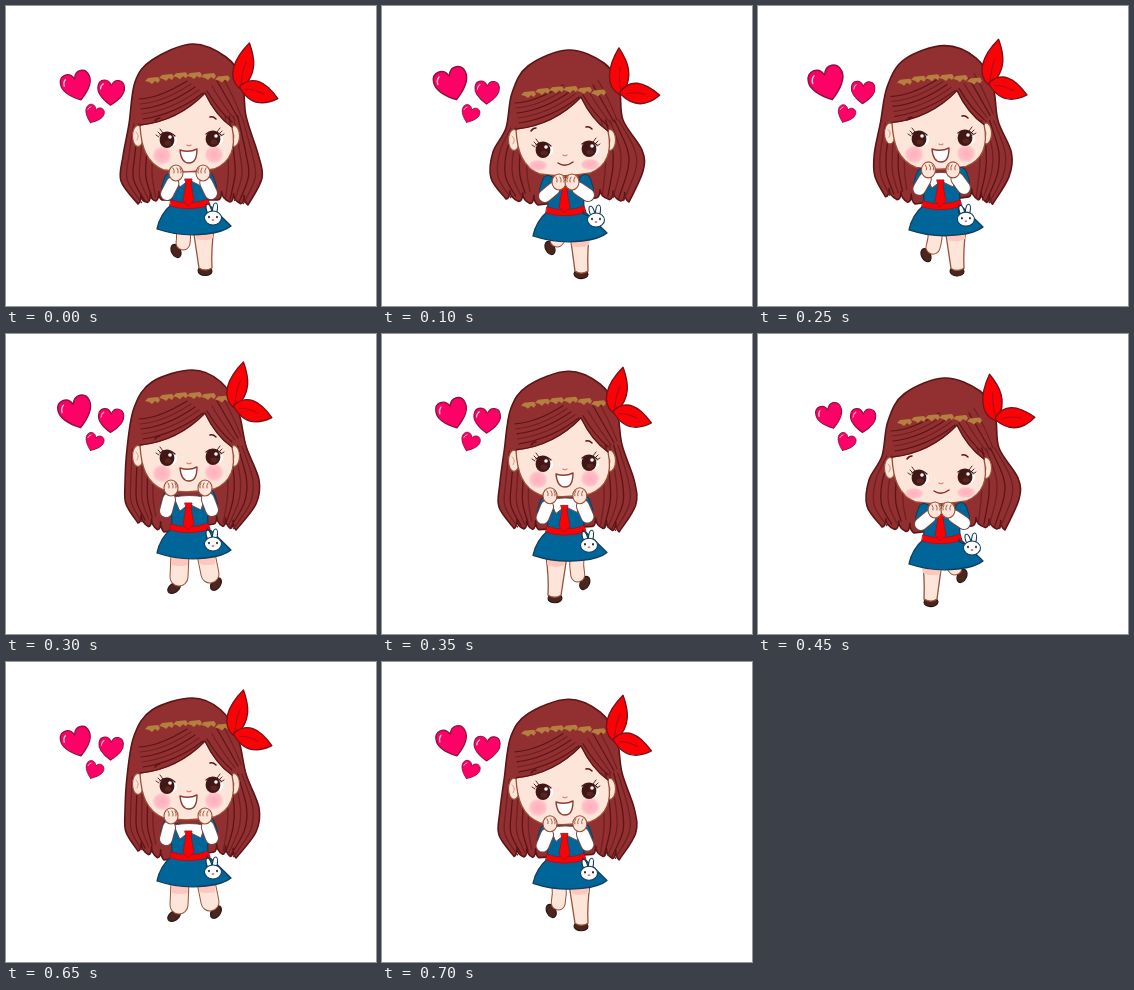
Recreate the animation shown at these times as an HTML page with a canvas. Size 370x300 px, loop 750 ms.

```html
<!DOCTYPE html>
<html lang="en">
<head>
<meta charset="utf-8">
<title>Happy girl</title>
<style>
  html, body { margin: 0; width: 100%; height: 100%; overflow: hidden; background: #fff; }
  canvas { display: block; }
</style>
</head>
<body>
<canvas id="stage" width="370" height="300"></canvas>
<script>
const ctx = document.getElementById('stage').getContext('2d');
const STEP = 50, STEPS = 15;
const INK = '#5c1517', HAIR = '#922f31', SHADE = '#6f2023', GOLD = '#b5803f';
const SKIN = '#fee5d9', SKIN_INK = '#9a5138', BLUE = '#00669a', NAVY = '#123d5b';
const RED = '#fb0306', PINK = '#ff0066', SHOE = '#4b261e', CUFF_INK = '#71494a';

// Offsets are relative to the middle pose; left and right are hair contours.
const MID = {
  cap: 0, face: 0, eyes: 0, gold: 0, body: 0,
  hands: [170, 167, 197, 167], elbows: [161, 188, 205, 187],
  bow: [234, 80, 0], bunny: [207, 211], lift: [170, 245],
  left: [[146, 54], [129, 76], [123, 118], [117, 150], [115, 175], [132, 198], [156, 194]],
  right: [[220, 51], [236, 74], [240, 110], [252, 148], [256, 172], [242, 199], [212, 194]]
};
const LOW = {
  cap: 6, face: 4, eyes: 10, gold: 14, body: 7,
  hands: [177, 176, 190, 176], elbows: [163, 190, 206, 189],
  bow: [238, 86, -.24], bunny: [214, 213], lift: [168, 242],
  left: [[146, 60], [130, 87], [124, 122], [111, 146], [109, 172], [124, 193], [156, 199]],
  right: [[222, 57], [237, 82], [241, 114], [260, 144], [261, 165], [247, 196], [214, 192]]
};
const LANDING = { ...LOW, bow: [237, 84, -.34] };
const SETTLED = {
  ...LOW,
  bow: [235, 83, 0], bunny: [209, 216],
  left: [[147, 60], [131, 88], [124, 120], [113, 145], [113, 170], [122, 193], [156, 198]],
  right: [[222, 57], [238, 84], [240, 118], [254, 148], [252, 172], [240, 201], [214, 192]]
};
const HIGH = {
  cap: -2, face: -8, eyes: -10, gold: -8, body: -4,
  hands: [165, 154, 199, 154], elbows: [160, 177, 206, 176],
  bow: [228, 71, 0], bunny: [207, 209], lift: [168, 255],
  left: [[146, 48], [128, 74], [121, 115], [119, 150], [120, 170], [132, 189], [158, 198]],
  right: [[215, 48], [232, 76], [240, 112], [253, 146], [250, 170], [230, 196], [208, 190]]
};

function mix(a, b, t) {
  if (typeof a === 'number') return a + (b - a) * t;
  if (Array.isArray(a)) return a.map((v, i) => mix(v, b[i], t));
  return Object.fromEntries(Object.keys(a).map(k => [k, mix(a[k], b[k], t)]));
}

const falling = mix(HIGH, MID, .6), dropping = mix(MID, LOW, .55);
const sinking = mix(LOW, SETTLED, .5), rising = mix(SETTLED, HIGH, .55);
const POSES = [MID, dropping, LOW, sinking, SETTLED, rising, HIGH, falling,
  dropping, LANDING, sinking, SETTLED, rising, HIGH, falling];

function paint(path, fill, ink, width = 1.3) {
  if (fill) { ctx.fillStyle = fill; ctx.fill(path); }
  if (ink) { ctx.strokeStyle = ink; ctx.lineWidth = width; ctx.stroke(path); }
}
const shape = (d, fill, ink, width) => paint(new Path2D(d), fill, ink, width);

function oval(x, y, rx, ry, fill, ink, turn = 0) {
  const path = new Path2D();
  path.ellipse(x, y, rx, ry, turn, 0, Math.PI * 2);
  paint(path, fill, ink, 1.1);
}

function limb(d, width, fill, ink) {
  shape(d, null, ink, width + 2);
  shape(d, null, fill, width);
}

function at(x, y, turn, scale, draw) {
  ctx.save();
  ctx.translate(x, y);
  ctx.rotate(turn);
  ctx.scale(scale, scale);
  draw();
  ctx.restore();
}

function spline(points) {
  const path = new Path2D();
  path.moveTo(...points[0]);
  for (let i = 0; i < points.length - 1; i++) {
    const a = points[Math.max(i - 1, 0)], b = points[i], c = points[i + 1];
    const d = points[Math.min(i + 2, points.length - 1)];
    path.bezierCurveTo(b[0] + (c[0] - a[0]) / 6, b[1] + (c[1] - a[1]) / 6,
      c[0] - (d[0] - b[0]) / 6, c[1] - (d[1] - b[1]) / 6, ...c);
  }
  return path;
}

// Curled lock ends between two points, each separated by a small notch.
function hairTips(path, from, to) {
  for (const k of [.25, .6, 1]) {
    const [x, y] = mix(from, to, k), [nx, ny] = mix(from, to, k - .12);
    path.quadraticCurveTo(nx, ny - 2, nx, ny - 9);
    path.quadraticCurveTo(nx, ny - 1, x, y);
  }
}

function drawHair(p) {
  const { left, right } = p;
  const outline = spline([...left.slice(0, 6).reverse(), [186, 38 + p.cap], ...right.slice(0, 6)]);
  hairTips(outline, right[5], right[6]);
  outline.lineTo(...left[6]);
  hairTips(outline, left[6], left[5]);
  outline.closePath();
  paint(outline, HAIR, INK, 1.6);
  for (const side of [left, right]) {
    const inner = side === left ? 154 : 214;
    [.16, .32, .48, .64, .8].forEach((k, i) => {
      const strand = side.slice(2, 6).map(([x, y], j) => [x + (inner - x) * k, y - j * k * 3]);
      paint(spline(strand), null, i % 2 ? INK : SHADE, 1.3);
    });
  }
}

function drawShoe(x, y, turn) {
  oval(x, y, 7, 4.5, SHOE, '#29120f', turn);
}

function drawLegs(p, side) {
  const hem = 226 + p.body;
  if (p === HIGH) {
    drawShoe(168, 254, -.6);
    drawShoe(210, 250, -.95);
    limb('M174 220L173 243', 17, SKIN, SKIN_INK);
    limb('M200 220L204 240', 17, SKIN, SKIN_INK);
    shape(`M166 ${hem}h16v9q-8 2 -16 0ZM193 ${hem}h16v8q-8 2 -16 0Z`, '#ffc6bb');
    return;
  }
  ctx.save();
  if (side < 0) { ctx.translate(372, 0); ctx.scale(-1, 1); }
  const [x, y] = p.lift, floor = 265 + p.body * .45;
  drawShoe(x, y, 1.1);
  limb(`M177 222Q178 232 ${x + 7} ${y - 8}`, 13, SKIN, SKIN_INK);
  drawShoe(199, floor, .05);
  shape(`M187 222Q190 242 193 ${floor - 3}Q199 ${floor + 1} 206 ${floor - 3}Q205 244 208 222Z`, SKIN, SKIN_INK);
  shape(`M189 ${hem}h18v6q-8 4 -17 1Z`, '#ffc6bb');
  ctx.restore();
}

function drawDress(p) {
  at(0, p.body, 0, 1, () => {
    shape('M165 166L201 166L202 198Q213 208 225 220Q218 226 200 228Q175 231 151 223Q154 208 166 198Z', BLUE, NAVY);
    shape('M165 194Q184 200 202 193L204 199Q184 206 164 200Z', RED, '#981820', .9);
    shape('M168 167Q183 164 199 167L195 180L183 174L174 181Z', '#fff', CUFF_INK, 1);
    shape('M179 173L186 173L185 178L188 194L182 200L177 194L180 178Z', RED, '#981820', .9);
  });
  const [x, y] = p.bunny;
  shape(`M201 ${198 + p.body}Q199 ${y - 4} ${x - 5} ${y - 3}`, null, NAVY, 1.2);
  oval(x - 4, y - 7, 2.4, 6, '#fff', NAVY, -.3);
  oval(x + 2, y - 8, 2.4, 6, '#fff', NAVY, .15);
  oval(x, y + 1, 8.5, 7, '#fff', NAVY);
  oval(x - 4, y, .9, 1.2, '#222');
  oval(x + 4, y, .9, 1.2, '#222');
  oval(x, y + 3, 1.3, .9, '#ef6987');
}

function drawEye(x, y, side) {
  oval(x + 2, y, 8.2, 7.6, '#fff');
  oval(x, y, 7.4, 8, '#411716');
  oval(x + 1, y + 3, 3.5, 2.6, '#5a2420');
  oval(x + 3, y - 3, 1.8, 1.8, '#fff');
  shape(`M${x - 7} ${y - 5}Q${x} ${y - 11} ${x + 8} ${y - 4}`, null, '#411716', 1.2);
  for (const k of [0, 1, 2]) {
    shape(`M${x + side * (8 - k * 2)} ${y - 3 - k * 2}l${side * 3} ${-2 - k}`, null, '#411716', .9);
  }
}

function drawBlush(x, y, height) {
  const glow = ctx.createRadialGradient(0, 0, 1, 0, 0, 10);
  glow.addColorStop(0, '#ffb0bc');
  glow.addColorStop(.65, '#ffb8c4dd');
  glow.addColorStop(1, '#ffb8c400');
  ctx.save();
  ctx.translate(x, y);
  ctx.scale(1, height / 10);
  oval(0, 0, 10, 10, glow);
  ctx.restore();
}

function drawFace(p) {
  const grin = p.eyes < 4;
  at(0, p.face, 0, 1, () => {
    for (const x of [132, 228]) {
      oval(x, 130, 5.5, 10.5, SKIN, SKIN_INK);
      shape(`M${x - 2} 126q4 3 1 8`, null, '#dc9987', 1);
    }
    shape('M134 119Q172 115 199 87Q210 110 226 121C230 140 226 156 208 163Q183 168 158 164C140 157 135 140 134 119Z', SKIN, SKIN_INK);
  });
  at(0, p.eyes, 0, 1, () => {
    drawBlush(156, 149.5, grin ? 9.5 : 6);
    drawBlush(208, 148.5, grin ? 9.5 : 6);
    drawEye(161, 134, -1);
    drawEye(207, 133, 1);
    shape('M149 115Q151 112 154 112M204 111Q207 110 210 113', null, INK, 1.5);
    shape('M181 139q2 1.5 4 0', null, '#d88270', 1.2);
    if (grin) {
      shape('M174 144Q183 147 191 143Q191 157 183 157Q175 157 174 144Z', '#fff', '#8e3d33', 1.4);
    } else {
      shape('M176 147Q183 152 191 146', null, '#7c2927', 1.3);
    }
  });
}

function drawFringe(p) {
  const y = 87 + p.face;
  shape(`M134 ${y + 32}Q172 ${y + 28} 199 ${y}Q210 ${y + 23} 226 ${y + 34}`, null, INK, 1.4);
  for (let i = 0; i < 5; i++) {
    const ink = i % 2 ? SHADE : INK;
    shape(`M${197 - i * 4} ${y - i * 3}Q${170 - i * 4} ${y + 21 - i * 4} ${137 - i} ${y + 26 - i * 5}`, null, ink, 1.2);
    if (i < 4) shape(`M${201 + i * 5} ${y - 2 - i * 5}Q${212 + i * 5} ${y + 17 - i * 5} ${226 + i * 3} ${y + 29 - i * 2}`, null, ink, 1.2);
  }
  const g = 68 + p.gold;
  for (let i = 0; i < 6; i++) {
    const x = 146 + i * 14, bend = ((x - 184) / 18) ** 2 * 1.1;
    shape(`M${x - 7} ${g + bend + 2}l3 -3l10 -1l2 3l-2 3l-3 -2l-3 3l-3 -2Z`, GOLD);
  }
}

function drawArms(p) {
  for (const i of [0, 2]) {
    const out = i ? 1 : -1;
    const hx = p.hands[i], hy = p.hands[i + 1], ex = p.elbows[i], ey = p.elbows[i + 1];
    limb(`M${ex - out * 3} ${ey - 15}L${ex} ${ey - 6}`, 10, BLUE, NAVY);
    limb(`M${ex} ${ey}L${mix(ex, hx, .6)} ${mix(ey, hy, .5)}`, 12, '#fff', CUFF_INK);
    oval(hx, hy, 7, 8, SKIN, SKIN_INK);
    for (const k of [-3, 1, 4]) {
      shape(`M${hx - out * k} ${hy - 5}q${-out * 2} 3 ${-out} 5`, null, SKIN_INK, .9);
    }
  }
}

function drawBow([x, y, turn]) {
  at(x, y, turn, 1.05, () => {
    shape('M-1 2C-12 -8 -7 -25 9 -41C14 -27 17 -12 2 2Z', RED, '#7c1118');
    shape('M0 0C12 -10 24 -5 36 12C22 19 9 17 0 2Z', RED, '#7c1118');
    shape('M1 -2Q2 -14 6 -23M5 3Q15 3 23 8', null, '#a80d18', 1);
  });
}

function drawHeart(x, y, width, turn) {
  at(x, y, turn, width / 30, () => {
    shape('M0 15C-9 9 -16 1 -15 -6C-14 -15 -3 -16 0 -7C3 -16 14 -15 15 -6C16 1 9 9 0 15Z', PINK, '#8c123e', 1.3);
    shape('M-12 -3Q-12 -7 -9 -9', null, '#ffc4da', 1.3);
  });
}

function bigHeartWidth(step) {
  const keys = [[0, 30], [4, 37], [6, 33], [9, 26], [11, 29], [15, 31]];
  const i = keys.findIndex(k => k[0] > step);
  const [a, from] = keys[i - 1], [b, to] = keys[i];
  return mix(from, to, (step - a) / (b - a));
}

function draw(now) {
  const step = Math.floor(now / STEP) % STEPS;
  const pose = POSES[step];
  const leg = step > 6 && step < 13 ? -1 : 1;
  ctx.fillStyle = '#fff';
  ctx.fillRect(0, 0, 370, 300);
  ctx.lineCap = ctx.lineJoin = 'round';

  const big = bigHeartWidth(step), beat = Math.cos(step * Math.PI * 2 / 7.5);
  drawHeart(70 + (32 - big) * .3, 79 + (31 - big) * .55, big, -.3);
  drawHeart(105, 86, 24.5 + beat * 2, .04);
  drawHeart(88, 108, 18 + beat * .7, .4);

  drawHair(pose);
  drawLegs(pose, leg);
  drawDress(pose);
  drawFace(pose);
  drawFringe(pose);
  drawArms(pose);
  drawBow(pose.bow);
}

function tick() {
  draw(performance.now());
  requestAnimationFrame(tick);
}
tick();
</script>
</body>
</html>
```
